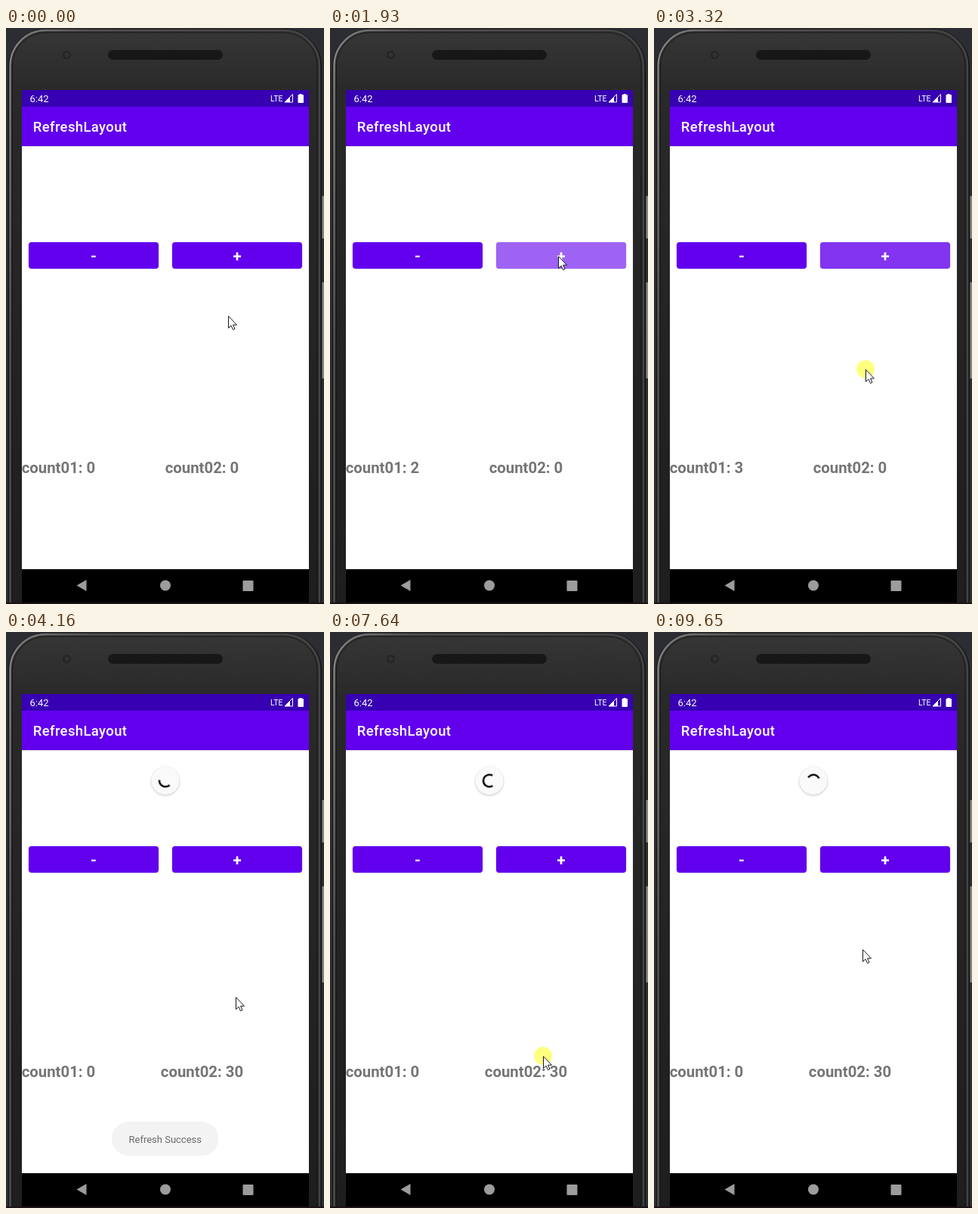
An HTML page for the animation above (9730 ms loop, 421 by 761 pixels).

```html
<!DOCTYPE html>
<html lang="en">
<head>
<meta charset="utf-8">
<title>Pull to refresh demo</title>
<style>
html, body { margin: 0; width: 100%; height: 100%; overflow: hidden; background: #2c2d32; }
svg { display: block; width: 421px; height: 761px; font-family: Roboto, "Open Sans", sans-serif; }
.title { font-size: 18.5px; font-weight: 500; letter-spacing: .36px; }
.sign { font-size: 20.35px; font-weight: 700; text-anchor: middle; }
.count { font-size: 20.35px; font-weight: 700; text-anchor: middle; fill: #757575; }
.button { fill: #6200ee; filter: drop-shadow(0 .5px .8px rgba(0,0,0,.2)); }
.white { fill: #fff; }

.cursor, .press, .ripple, .count, .disc, .spin, .ring, .toast {
  animation: 9.73s linear infinite;
}
.cursor { animation-name: move; }
.press { animation-name: press; animation-timing-function: step-end; }
.ripple { animation-name: ripple; }
.toast { animation-name: toast; }
.disc { animation-name: pull; }
.spin { animation-name: spin; }
.ring { animation-name: trim; animation-timing-function: cubic-bezier(.4,0,.2,1); }
.count { animation-timing-function: step-end; }
.idle { animation-name: idle; }
.one { animation-name: one; }
.two { animation-name: two; }
.three { animation-name: three; }
.before { animation-name: before; }
.after { animation-name: after; }

@keyframes move {
  0%, 3.8% { transform: translate(294px,380px); animation-timing-function: ease-in-out; }
  7.3%, 24.55% { transform: translate(302px,301px); }
  24.56%, 30.83% { transform: translate(300px,306px); }
  32.68% { transform: translate(285px,390px); }
  34.12% { transform: translate(280px,450px); }
  37%, 38.44% { transform: translate(280px,624px); animation-timing-function: ease-in-out; }
  42.14%, 43.47% { transform: translate(304px,482px); }
  46.04%, 50.15% { transform: translate(318px,445px); }
  52.42% { transform: translate(321px,400px); }
  59.4%, 70.6% { transform: translate(290px,223px); }
  72.66% { transform: translate(299px,310px); }
  75.03% { transform: translate(285px,440px); }
  77.7%, 81.19% { transform: translate(282px,560px); }
  84.28% { transform: translate(288px,510px); }
  91.26%, 100% { transform: translate(276px,419px); }
}
@keyframes press {
  0%, 11.41%, 17.88%, 30.83%, 37.62%, 81.19%, 100% { opacity: 0; }
  9.97%, 16.44%, 29.29%, 32.68%, 75.03% { opacity: 1; }
}
@keyframes ripple {
  0%, 9.96% { opacity: 0; transform: scale(.15); }
  9.97% { opacity: .39; transform: scale(.15); }
  12.13%, 13.36% { opacity: .39; transform: scale(1); }
  15.42% { opacity: 0; transform: scale(1); }
  16.43% { opacity: 0; transform: scale(.15); }
  16.44% { opacity: .39; transform: scale(.15); }
  18.6%, 19.87% { opacity: .39; transform: scale(1); }
  22.1% { opacity: 0; transform: scale(1); }
  29.28% { opacity: 0; transform: scale(.15); }
  29.29% { opacity: .39; transform: scale(.15); }
  31.45%, 32.68% { opacity: .39; transform: scale(1); }
  35.77%, 100% { opacity: 0; transform: scale(1); }
}
@keyframes idle { 0%, 39.05%, 100% { opacity: 1; } 11.41% { opacity: 0; } }
@keyframes one { 0%, 17.88%, 100% { opacity: 0; } 11.41% { opacity: 1; } }
@keyframes two { 0%, 30.83%, 100% { opacity: 0; } 17.88% { opacity: 1; } }
@keyframes three { 0%, 39.05%, 100% { opacity: 0; } 30.83% { opacity: 1; } }
@keyframes before { 0% { opacity: 1; } 39.05%, 100% { opacity: 0; } }
@keyframes after { 0% { opacity: 0; } 39.05%, 100% { opacity: 1; } }
@keyframes toast {
  0%, 41% { opacity: 0; }
  43.4%, 62.2% { opacity: 1; }
  65%, 100% { opacity: 0; }
}
@keyframes pull {
  0%, 34.13% { transform: translateY(-62px); }
  35% { transform: translateY(-32px); }
  37.4%, 37.7% { transform: translateY(30px); animation-timing-function: ease-out; }
  39.05%, 100% { transform: translateY(0); }
}
@keyframes spin {
  0%, 34.1% { transform: rotate(-295deg); }
  37% { transform: rotate(-240deg); }
  40.185% { transform: rotate(-168deg); }
  46.907% { transform: rotate(-17deg); }
  46.908% { transform: rotate(-93deg); }
  61.192% { transform: rotate(223deg); }
  61.193% { transform: rotate(147.5deg); }
  74.851% { transform: rotate(428.6deg); }
  74.852% { transform: rotate(353deg); }
  89.414% { transform: rotate(641.6deg); }
  89.415% { transform: rotate(566deg); }
  100% { transform: rotate(777deg); }
}
@keyframes trim {
  0%, 34.1% { stroke-dasharray: 0px 360px; stroke-dashoffset: 0px; opacity: .3; }
  36.2%, 100% { opacity: 1; }
  37%, 40.185%, 54.049%, 68.016%, 82.117% { stroke-dasharray: 288px 360px; stroke-dashoffset: 0px; }
  46.907%, 61.192%, 74.851%, 89.414% { stroke-dasharray: 3.6px 360px; stroke-dashoffset: -284.4px; }
  46.908%, 61.193%, 74.852%, 89.415% { stroke-dasharray: 3.6px 360px; stroke-dashoffset: 0px; }
  96.351% {
    stroke-dasharray: 288px 360px; stroke-dashoffset: 0px;
    animation-timing-function: cubic-bezier(.545,0,.502,.64);
  }
  100% { stroke-dasharray: 57.9px 360px; stroke-dashoffset: -230.1px; }
}
</style>
</head>
<body>
<svg viewBox="0 0 421 761">
  <defs>
    <linearGradient id="body" x2="0" y2="1">
      <stop offset="0" stop-color="#363636"/>
      <stop offset=".1" stop-color="#292929"/>
      <stop offset="1" stop-color="#1d1d1d"/>
    </linearGradient>
    <linearGradient id="rim" x2=".7" y2=".35">
      <stop offset="0" stop-color="#858585"/>
      <stop offset=".3" stop-color="#505050"/>
      <stop offset="1" stop-color="#444"/>
    </linearGradient>
    <pattern id="mesh" width="4" height="4" patternUnits="userSpaceOnUse">
      <rect width="4" height="4" fill="#131313"/>
      <circle cx="1" cy="1" r=".8" fill="#242424"/>
      <circle cx="3" cy="3" r=".8" fill="#242424"/>
    </pattern>
    <clipPath id="page"><rect x="21" y="156" width="380" height="559"/></clipPath>
    <clipPath id="plus"><rect x="220" y="283" width="172" height="35" rx="4"/></clipPath>
  </defs>

  <!-- phone -->
  <rect width="421" height="761" fill="#2c2d32"/>
  <rect x="418.5" y="222" width="4" height="56" fill="#858585"/>
  <rect x="418.5" y="336" width="4" height="127" fill="#858585"/>
  <rect x="3" y="1" width="415" height="820" rx="50" fill="#151515"/>
  <rect x="5.5" y="3" width="409.5" height="820" rx="47" fill="url(#body)" stroke="url(#rim)" stroke-width="2.5"/>
  <rect x="8.5" y="6" width="403.5" height="820" rx="44" fill="none" stroke="#181818"/>
  <circle cx="80.5" cy="35.5" r="5.5" fill="#252525"/>
  <circle cx="80.5" cy="35.5" r="3" fill="#303239"/>
  <rect x="135" y="29" width="152" height="13" rx="6.5" fill="url(#mesh)"/>

  <!-- screen -->
  <rect x="21" y="82" width="380" height="22" fill="#3700b3"/>
  <rect x="21" y="104" width="380" height="52" fill="#6200ee"/>
  <rect x="21" y="156" width="380" height="559" fill="#fff"/>
  <rect x="21" y="156" width="380" height="1" fill="#dedede"/>
  <rect x="21" y="715" width="380" height="44" fill="#000"/>
  <rect y="759" width="421" height="2" fill="#1b1316"/>
  <g class="white">
    <text x="31.5" y="98" font-size="13">6:42</text>
    <text x="350" y="97" font-size="10.5">LTE</text>
    <path d="M379.5 87.5V98H369Z" fill="none" stroke="#fff"/>
    <path d="M376 91V98H369Z"/>
    <path d="M388.5 87h3v1h1.5q1 0 1 1v9q0 1-1 1h-5.500q-1 0-1-1v-9q0-1 1-1h1z"/>
    <text class="title" x="35.8" y="137">RefreshLayout</text>
  </g>
  <g fill="#9c9c9c">
    <path d="M93.5 736.5L106.5 729V744Z"/>
    <circle cx="211" cy="736.5" r="7"/>
    <rect x="313.5" y="730" width="14" height="14" rx="1"/>
  </g>

  <!-- page -->
  <rect class="button" x="30" y="283" width="172" height="35" rx="4"/>
  <rect class="button" x="220" y="283" width="172" height="35" rx="4"/>
  <g clip-path="url(#plus)">
    <g transform="translate(303 301)"><circle class="ripple white" r="92"/></g>
  </g>
  <g class="white">
    <text class="sign" x="116" y="308">-</text>
    <text class="sign" x="306" y="308">+</text>
  </g>
  <text class="count idle" x="69.5" y="588">count01: 0</text>
  <text class="count one" x="69.5" y="588">count01: 1</text>
  <text class="count two" x="69.5" y="588">count01: 2</text>
  <text class="count three" x="69.5" y="588">count01: 3</text>
  <text class="count before" x="259.5" y="588">count02: 0</text>
  <text class="count after" x="259.5" y="588">count02: 30</text>

  <g clip-path="url(#page)">
    <g transform="translate(211 196.5)">
      <g class="disc">
        <circle r="18.5" fill="#fafafa" style="filter: drop-shadow(0 1px 1.5px rgba(0,0,0,.25))"/>
        <g class="spin">
          <circle class="ring" r="8" pathLength="360" fill="none" stroke="#000" stroke-width="2.4" stroke-linecap="square"/>
        </g>
      </g>
    </g>
  </g>

  <g class="toast">
    <rect x="140" y="647" width="141.5" height="45" rx="22.5" fill="#f0f0f0"/>
    <text x="210.75" y="675" font-size="13" text-anchor="middle" fill="#333">Refresh Success</text>
  </g>

  <g class="cursor">
    <circle class="press" r="12" fill="#ff0" fill-opacity=".5"/>
    <path d="M.5 .7V16.500L4.100 13.200L6.500 18.600L9 17.500L6.600 12.200H11.500Z" fill="#fff" stroke="#15151f"/>
  </g>
</svg>
</body>
</html>
```
